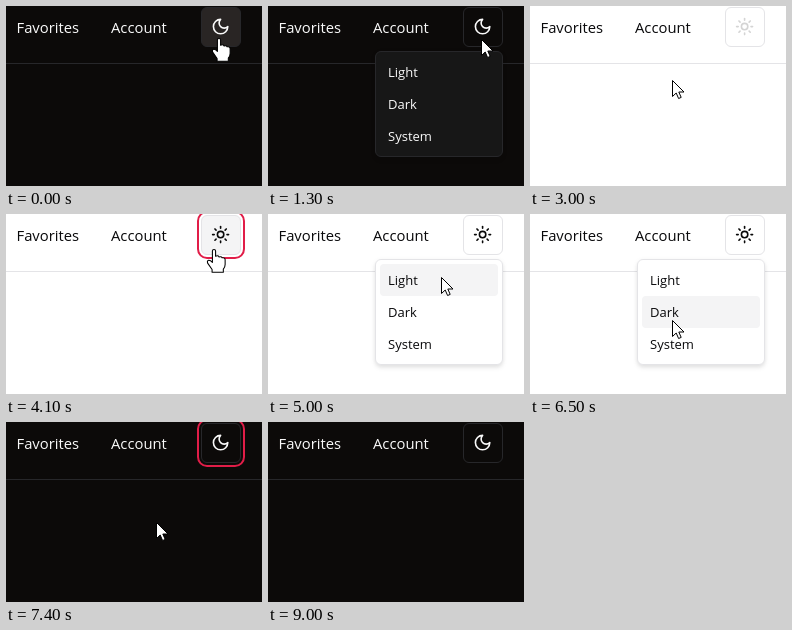
These frames come from a looping animation (256 by 180 pixels, 9100 ms). An HTML page:

```html
<!DOCTYPE html>
<html lang="en">
<head>
<meta charset="utf-8">
<title>Theme switcher</title>
<style>
  html, body { margin: 0; width: 100%; height: 100%; overflow: hidden; }
  svg {
    display: block; width: 256px; height: 180px;
    font: 500 14.8px "Open Sans", "Noto Sans", sans-serif;
    --bg: #fff; --fg: #09090b; --popover: #fff; --accent: #f4f4f5; --border: #e4e4e7;
  }
  svg.dark {
    --bg: #0c0a09; --fg: #fafafa; --popover: #171717; --accent: #292524; --border: #27272a;
  }
  text { fill: var(--fg); }
  .bg { fill: var(--bg); }
  .line { fill: var(--border); }
  .box { stroke: var(--border); }
  .panel { fill: var(--popover); filter: drop-shadow(0 3px 2px rgba(0,0,0,.08)) drop-shadow(0 1px 2px rgba(0,0,0,.06)); }
  #menu { font-size: 13px; }
  #active { fill: var(--accent); }
  #ring { fill: none; stroke: #e11d48; stroke-width: 2; }
  #icon { fill: none; stroke-width: 2; stroke-linecap: round; stroke-linejoin: round; }
  #pointer { fill: #fff; stroke: #000; stroke-linejoin: round; }
</style>
</head>
<body>
<svg id="stage" viewBox="0 0 256 180">
  <rect class="bg" width="256" height="180"/>
  <rect class="line" y="57" width="256" height="1"/>
  <text x="10.5" y="27">Favorites</text>
  <text x="105" y="27">Account</text>

  <rect id="ring" x="192" y="-2" width="46" height="46" rx="9"/>
  <rect id="button" class="box" x="195.5" y="1.5" width="39" height="39" rx="5.5"/>
  <g id="icon" transform="translate(205 11) scale(.8)">
    <path id="moon" d="M12 3a6 6 0 0 0 9 9 9 9 0 1 1-9-9Z"/>
    <g id="sun"><circle cx="12" cy="12" r="4"/></g>
  </g>

  <g id="menu">
    <rect class="box panel" x="107.5" y="45.5" width="127" height="105" rx="5.5"/>
    <rect id="active" x="112" width="118" height="32" rx="4"/>
  </g>

  <g id="pointer">
    <path id="arrow" d="M.5.5V16.5L4.2 13 6.6 18.5 9.2 17.4 6.8 12H12Z"/>
    <path id="hand" transform="translate(0 -.5) scale(1.06 1.03)" d="M-1.5 1.5Q-1.5 0 0 0T1.5 1.5V6.5Q4 5.5 4.8 7.2 7 6.4 7.6 8.1 10.5 7.6 10.5 10V14.5Q10.5 17 8.8 19V22H-1.8V19.5L-6 13.2Q-6.8 11-5 10.4-3.5 10.2-1.5 12.5Z"/>
  </g>
</svg>
<script>
const LOOP = 9100, STEP = 100;
const OPEN_FIRST = 1100, TO_LIGHT = 3000, OPEN_AGAIN = 4600, TO_DARK = 6700;
const POINTER_GONE = 7900, BLUR = 9000;
const MENU = { x: 112, y: 50, width: 118, row: 32, items: ["Light", "Dark", "System"] };

const HOME = { x: 213, y: 33 };
const MOVES = [
  { from: 1500, to: 2400, x: 142, y: 74 },
  { from: 3300, to: 3500, x: 150, y: 74 },
  { from: 3600, to: 4200, ...HOME },
  { from: 4600, to: 5000, x: 173, y: 63 },
  { from: 5000, to: 6000, x: 143, y: 122 },
  { from: 6100, to: 6500, x: 142, y: 106 },
  { from: 7200, to: 7400, x: 150, y: 100 },
  { from: 7700, to: 7800, x: 24, y: 114 }
];

const el = Object.fromEntries([...document.querySelectorAll("[id]")].map(e => [e.id, e]));
const show = (node, on) => node.style.display = on ? "" : "none";
const between = (v, from, to) => v >= from && v < to;
const clamp = v => Math.max(0, Math.min(1, v));
const mix = (a, b, k) => a + (b - a) * k;
const smooth = k => k * k * (3 - 2 * k);

function add(parent, tag, attrs, content = "") {
  const node = document.createElementNS("http://www.w3.org/2000/svg", tag);
  for (const name in attrs) node.setAttribute(name, attrs[name]);
  node.textContent = content;
  parent.append(node);
}

for (let angle = 0; angle < 360; angle += 45)
  add(el.sun, "path", { d: "M12 2v2", transform: `rotate(${angle} 12 12)` });
MENU.items.forEach((label, i) =>
  add(el.menu, "text", { x: MENU.x + 8, y: MENU.y + 21 + i * MENU.row }, label));

function pointerAt(t) {
  let { x, y } = HOME;
  for (const move of MOVES) {
    const k = smooth(clamp((t - move.from) / (move.to - move.from)));
    x = mix(x, move.x, k);
    y = mix(y, move.y, k);
  }
  return [Math.round(x), Math.round(y)];
}

function iconColor(t, dark) {
  const since = t - (dark ? TO_DARK : TO_LIGHT);
  const k = since < 0 ? 1 : clamp(.13 + since / 160);
  const v = Math.round(dark ? mix(9, 250, k) : mix(242, 9, k));
  return `rgb(${v},${v},${v})`;
}

function drawMenu(age, x, y) {
  const k = clamp(.35 + age / 200);
  el.menu.style.opacity = k;
  el.menu.setAttribute("transform",
    `translate(171 ${mix(37, 45, k)}) scale(${mix(.95, 1, k)}) translate(-171 -45)`);
  const row = Math.floor((y - MENU.y) / MENU.row);
  show(el.active, between(x, MENU.x, MENU.x + MENU.width) && between(row, 0, MENU.items.length));
  el.active.setAttribute("y", MENU.y + row * MENU.row);
}

function render(t) {
  const dark = !between(t, TO_LIGHT, TO_DARK);
  const opened = between(t, OPEN_FIRST, TO_LIGHT) ? OPEN_FIRST
    : between(t, OPEN_AGAIN, TO_DARK) ? OPEN_AGAIN : null;
  const focused = between(t, TO_LIGHT + STEP, OPEN_AGAIN) || between(t, TO_DARK + STEP, BLUR);
  const [x, y] = pointerAt(t);
  const hover = opened === null && between(x, 195, 235) && between(y, 1, 41);

  el.stage.setAttribute("class", dark ? "dark" : "");
  el.button.style.fill = `var(--${hover ? "accent" : "bg"})`;
  el.icon.style.stroke = iconColor(t, dark);
  show(el.moon, dark);
  show(el.sun, !dark);
  show(el.ring, focused);

  show(el.menu, opened !== null);
  if (opened !== null) drawMenu(t - opened, x, y);

  show(el.pointer, t < POINTER_GONE);
  el.pointer.setAttribute("transform", `translate(${x} ${y})`);
  show(el.hand, hover);
  show(el.arrow, !hover);
}

const start = performance.now();
function tick() {
  const t = (performance.now() - start) % LOOP;
  render(Math.floor(t / STEP) * STEP);
  requestAnimationFrame(tick);
}
tick();
</script>
</body>
</html>
```
